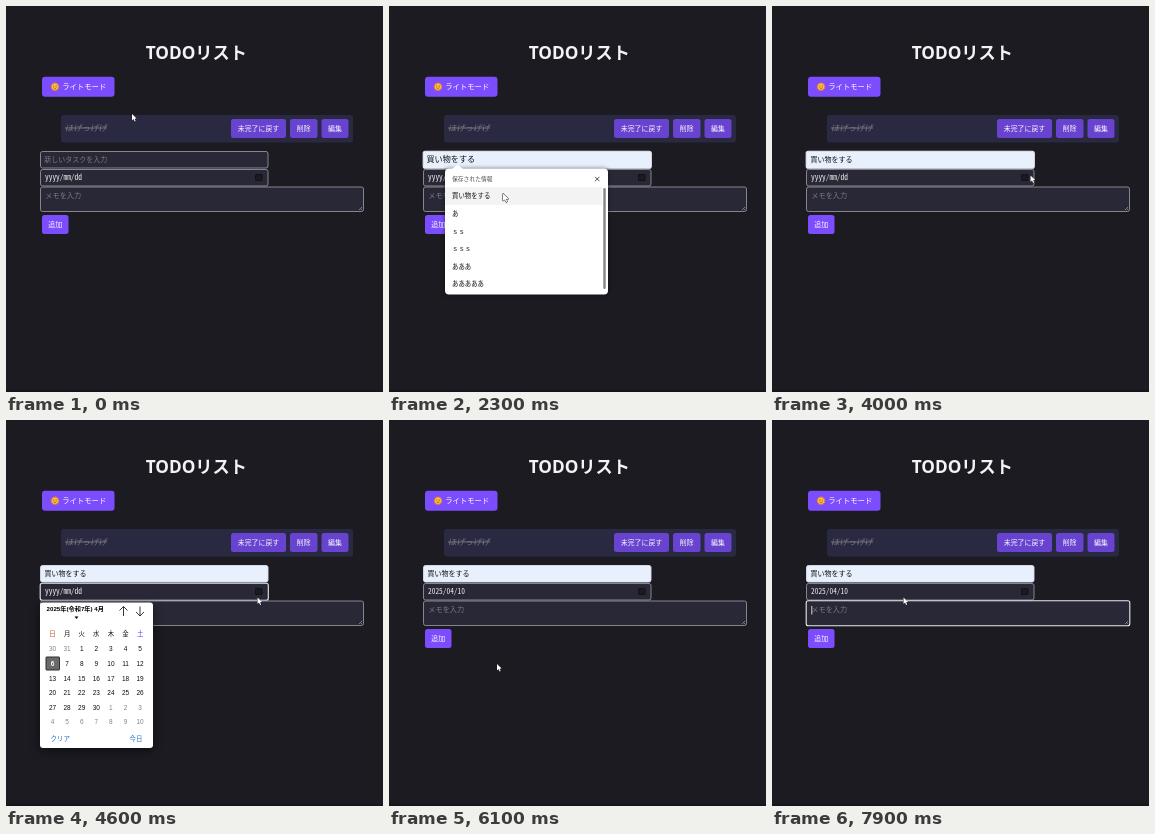
Write an HTML page with a canvas that moves like this. It is 377 px wide and 386 px high and loops after 8 s.

```html
<!DOCTYPE html>
<html lang="ja">
<head>
<meta charset="utf-8">
<style>
html, body { margin: 0; width: 100%; height: 100%; overflow: hidden; background: #1c1b22; }
canvas { display: block; width: 377px; height: 386px; }
</style>
</head>
<body>
<canvas id="stage"></canvas>
<script>
const W = 377, H = 386, LOOP = 8000, STEP = 100;
const SANS = '"Noto Sans", "Noto Sans CJK JP", "Noto Sans CJK", sans-serif';
const CJK = '"Noto Sans CJK JP", "Noto Sans CJK", sans-serif';
const MONO = '"Noto Sans Mono CJK JP", "Noto Sans Mono", monospace';
const ARIAL = '"Liberation Sans", "Noto Sans CJK JP", sans-serif';

const T = { popup: 1900, preview: 2200, accept: 3100, date: 4500, calendar: 4600, pick: 5800, memo: 6800 };

const canvas = document.getElementById('stage');
const dpr = window.devicePixelRatio || 1;
canvas.width = W * dpr;
canvas.height = H * dpr;
const c = canvas.getContext('2d');

const clamp = v => Math.max(0, Math.min(1, v));

function box(x, y, w, h, r, fill, stroke, line = 1) {
  c.beginPath();
  c.roundRect(x, y, w, h, r);
  if (fill) { c.fillStyle = fill; c.fill(); }
  if (stroke) { c.strokeStyle = stroke; c.lineWidth = line; c.stroke(); }
}

function text(s, x, y, size, color, { font = CJK, weight = 400, align = 'left' } = {}) {
  c.font = `${weight} ${size}px ${font}`;
  c.textAlign = align;
  c.textBaseline = 'alphabetic';
  c.fillStyle = color;
  c.fillText(s, x, y + size * 0.37);
}

function line(color, width, ...p) {
  c.strokeStyle = color;
  c.lineWidth = width;
  c.beginPath();
  for (let i = 0; i < p.length; i += 2) c.lineTo(p[i], p[i + 1]);
  c.stroke();
}

function button(label, x, y, w, h, fill = '#7c4dff') {
  box(x, y, w, h, 2.5, fill);
  text(label, x + w / 2, y + h / 2 - 0.3, 6.9, '#fff', { align: 'center' });
}

function sun(x, y) {
  c.fillStyle = '#f08a24';
  c.beginPath();
  for (let i = 0; i < 24; i++) {
    const a = i * Math.PI / 12, r = i % 2 ? 3.6 : 4.6;
    c.lineTo(x + r * Math.cos(a), y + r * Math.sin(a));
  }
  c.fill();
  c.fillStyle = '#fbc34a';
  c.beginPath();
  c.arc(x, y, 3, 0, 7);
  c.fill();
  c.fillStyle = '#7a4312';
  c.fillRect(x - 1.6, y - 1.2, 0.9, 1);
  c.fillRect(x + 0.7, y - 1.2, 0.9, 1);
  c.strokeStyle = '#9a4a14';
  c.lineWidth = 0.7;
  c.beginPath();
  c.arc(x, y + 0.4, 1.4, 0.2, 2.9);
  c.stroke();
}

function task() {
  box(55, 109, 292, 27.5, 3, '#2a2942');
  c.save();
  c.transform(1, 0, -0.18, 1, 22, 0);
  text('ほげっげげ', 59.5, 121.8, 8.4, '#74727e');
  c.restore();
  line('#85838c', 0.8, 59, 122, 101, 122);
  const dim = '#6743cf';
  button('未完了に戻す', 225, 113, 55, 19, dim);
  button('削除', 284, 113, 27.5, 19, dim);
  button('編集', 315.5, 113, 27, 19, dim);
}

const blink = (t, from) => t >= from && (t - from) % 1000 < 500;

function field(x, y, w, h, fill, border, focused) {
  if (focused) box(x - 0.3, y - 0.3, w + 0.6, h + 0.6, 2, fill, '#e9e9ee', 1.1);
  else box(x, y, w, h, 2, fill, border, 0.9);
}

function form(t) {
  const filled = t >= T.accept, preview = t >= T.preview && !filled;
  const light = filled || preview, gray = '#92919a', dark = '#292836';
  field(34.5, 145.5, 227.5, 16.5, light ? '#e8f0fe' : dark, light ? '#d9e0ef' : gray, t >= T.popup && t < T.date);
  if (preview) text('買い物をする', 37.5, 153.5, 8.1, '#111');
  else if (filled) text('買い物をする', 38.5, 153.3, 7, '#111');
  else text('新しいタスクを入力', 38.3, 153.3, 7, '#7b7a82');
  const typing = filled ? blink(t, T.accept) : blink(t, T.popup) && !preview;
  if (typing && t < T.date) {
    const x = filled ? 81 : 38.5;
    line(filled ? '#000' : '#fff', 0.8, x, 149.5, x, 158);
  }

  field(34.5, 163.5, 227.5, 16.5, dark, gray, t >= T.date && t < T.pick);
  text(t < T.pick ? 'yyyy/mm/dd' : '2025/04/10', 39, 171.5, 7.4, '#f2f2f4', { font: MONO });
  box(249.5, 168.5, 6.5, 6, 0.7, '#1b1a22', '#121117', 1);

  field(34.5, 181, 323, 24.5, dark, gray, t >= T.memo);
  text('メモを入力', 39.3, 189.5, 7.2, '#7b7a82');
  line('#b5b4ba', 0.6, 353, 204, 356, 201);
  line('#b5b4ba', 0.6, 355, 204, 356, 203);
  if (blink(t, T.memo)) line('#fff', 0.8, 39.8, 186, 39.8, 194.5);
  button('追加', 36, 209, 26.5, 19);
}

function popup(t) {
  const show = clamp((t - T.popup) / 300) * (1 - clamp((t - T.accept) / 300));
  if (!show) return;
  const k = 0.955 + 0.045 * show;
  c.save();
  c.globalAlpha = show;
  c.translate(137.5, 225.5);
  c.scale(k, k);
  c.translate(-137.5, -225.5);
  c.save();
  c.shadowColor = 'rgba(0,0,0,.5)';
  c.shadowBlur = 4;
  box(56, 162.5, 163, 126, 4, '#fff');
  c.restore();
  c.beginPath();
  c.moveTo(63, 163);
  c.lineTo(68.5, 158.5);
  c.lineTo(74, 163);
  c.fill();
  if (t >= T.preview && t < T.accept) {
    c.fillStyle = '#f3f3f3';
    c.fillRect(56, 181, 157, 18);
  }
  // dark ink stays dark while the panel turns transparent
  c.globalAlpha = Math.min(1, show * 1.6);
  text('保存された情報', 63, 173, 5.8, '#4f5156');
  line('#222', 0.8, 206, 170.8, 210.4, 175.2);
  line('#222', 0.8, 210.4, 170.8, 206, 175.2);
  ['買い物をする', 'あ', 'ｓｓ', 'ｓｓｓ', 'あああ', 'あああああ'].forEach((s, i) =>
    text(s, 63, 190 + i * 17.6, 6.4, '#111'));
  box(214.3, 182, 2.4, 101, 1.2, show < 1 ? '#5f5f61' : '#858585');
  c.restore();
}

function calendar(t) {
  if (t < T.calendar || t >= T.pick) return;
  c.save();
  c.shadowColor = 'rgba(0,0,0,.5)';
  c.shadowBlur = 10;
  c.shadowOffsetY = 3;
  box(34, 182.5, 113, 145.5, 3, '#fff');
  c.restore();
  text('2025年(令和7年) 4月', 40.5, 189, 6.2, '#000', { font: ARIAL, weight: 700 });
  c.beginPath();
  c.moveTo(68.5, 196.5);
  c.lineTo(72.5, 196.5);
  c.lineTo(70.5, 199);
  c.fill();
  line('#222', 0.9, 117.5, 196, 117.5, 186.5);
  line('#222', 0.9, 113.5, 190.5, 117.5, 186.5, 121.5, 190.5);
  line('#222', 0.9, 134, 186.5, 134, 196);
  line('#222', 0.9, 130, 192, 134, 196, 138, 192);
  const col = i => 46.5 + i * 14.6;
  [...'日月火水木金土'].forEach((s, i) =>
    text(s, col(i), 214, 6.4, i === 0 ? '#b5521b' : i === 6 ? '#3a38f0' : '#111', { align: 'center' }));
  box(40, 237, 13.5, 13, 0.5, '#6a6a6a', '#2d2d2d', 1);
  for (let i = 0; i < 42; i++) {
    const n = i - 1, inside = n >= 1 && n <= 30;
    const label = n < 1 ? n + 31 : n > 30 ? n - 30 : n;
    const today = n === 6;
    text(String(label), col(i % 7), 229 + Math.floor(i / 7) * 14.55, 6.5,
      today ? '#fff' : inside ? '#111' : '#858585',
      { font: ARIAL, align: 'center', weight: today ? 700 : 400 });
  }
  text('クリア', 44.5, 319, 6.5, '#1b6fc4');
  text('今日', 123.5, 319, 6.4, '#1b6fc4');
}

// time, x, y
const path = [
  [0, 126, 108], [400, 123, 114], [900, 105, 150], [1900, 101, 152], [2300, 114, 187.5],
  [2700, 121, 191], [3200, 122, 191], [3500, 165, 186], [3900, 257, 170], [4000, 258.5, 169.5],
  [4400, 253, 173], [4600, 251.5, 177.5], [5000, 232, 194], [5700, 106, 243], [6100, 108, 244],
  [6300, 110, 222], [6700, 125, 192], [7300, 127, 190], [7900, 131.5, 177.5], [8000, 131.5, 177.5]
];

function pointerAt(t) {
  const i = path.findIndex((p, n) => n && t <= p[0]);
  const a = path[i - 1], b = path[i];
  let k = (t - a[0]) / (b[0] - a[0]);
  k = k * k * (3 - 2 * k);
  return [a[1] + (b[1] - a[1]) * k, a[2] + (b[2] - a[2]) * k];
}

function pointer(t) {
  const [x, y] = pointerAt(t);
  const open = t > T.popup + 100 && t < T.accept + 200;
  const overText = !open && ((y > 145 && y < 162) || (y > 181 && y < 206 && t > T.pick));
  c.save();
  c.translate(x, y);
  if (overText) {
    line('#fff', 0.9, 0, -4.5, 0, 4.5);
    line('#fff', 0.9, -1.7, -4.5, 1.7, -4.5);
    line('#fff', 0.9, -1.7, 4.5, 1.7, 4.5);
  } else {
    const size = open ? 1 : 0.85;
    c.scale(size, size);
    c.beginPath();
    [0, 0, 0, 7.6, 1.8, 6, 3, 8.8, 4.3, 8.2, 3.1, 5.5, 5.5, 5.4].forEach((v, i, p) => {
      if (i % 2) c.lineTo(p[i - 1], v);
    });
    c.closePath();
    c.fillStyle = '#fff';
    c.strokeStyle = '#111';
    c.lineWidth = 1;
    c.stroke();
    c.fill();
  }
  c.restore();
}

function draw(t) {
  c.setTransform(dpr, 0, 0, dpr, 0, 0);
  c.fillStyle = '#1c1b22';
  c.fillRect(0, 0, W, H);
  c.fillStyle = '#16151b';
  c.fillRect(0, 384, W, 2);
  text('TODOリスト', 190.3, 46.3, 17.2, '#f3f3f5', { font: SANS, weight: 700, align: 'center' });
  box(36, 70.7, 72.5, 20, 3, '#7c4dff');
  sun(49, 80.7);
  text('ライトモード', 56.2, 80.5, 7.35, '#fff');
  task();
  form(t);
  popup(t);
  calendar(t);
  pointer(t);
}

let start;
function tick(now) {
  start ??= now;
  draw(Math.floor(((now - start) % LOOP) / STEP) * STEP);
  requestAnimationFrame(tick);
}
requestAnimationFrame(tick);
</script>
</body>
</html>
```
